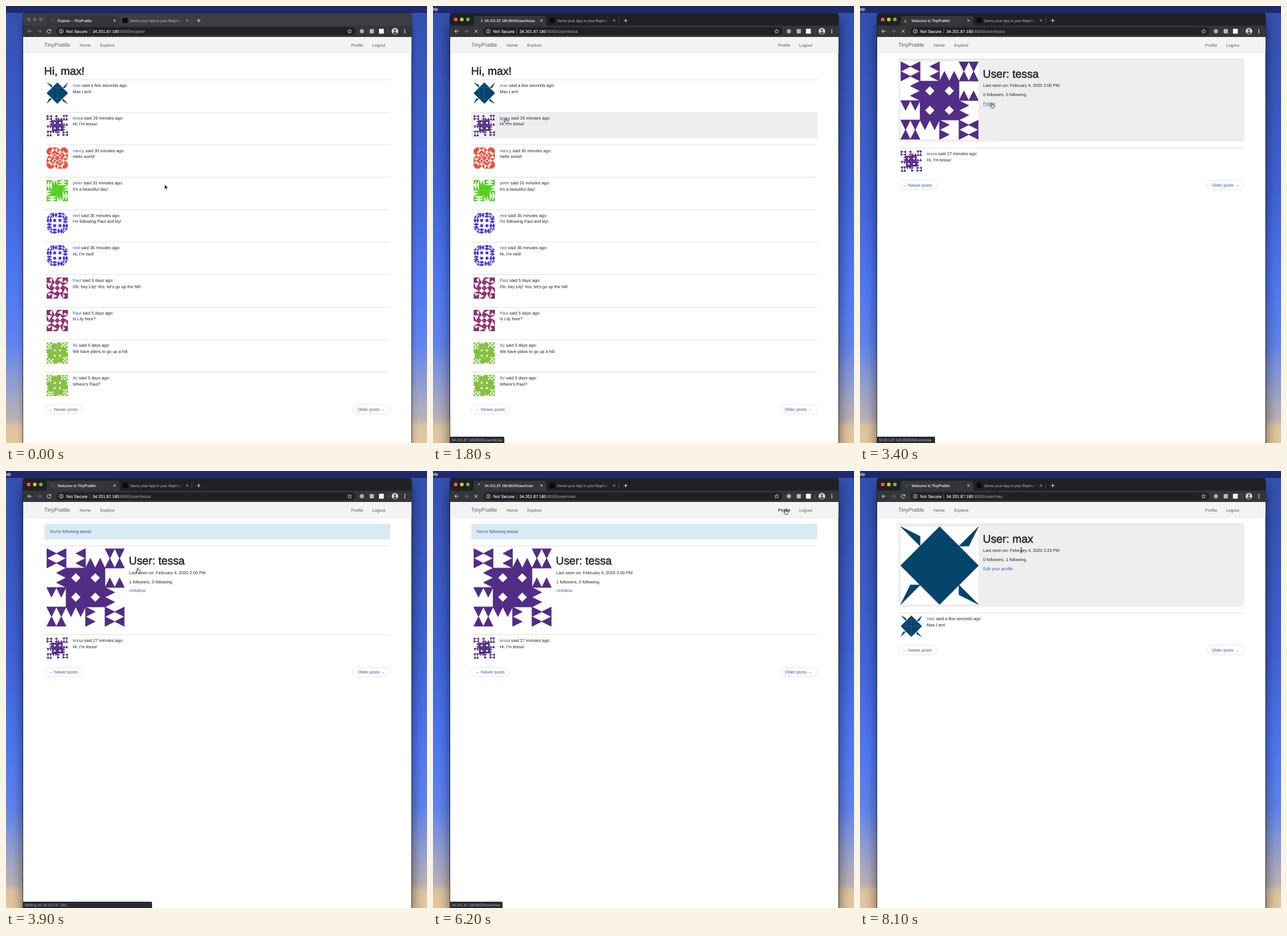
An HTML page for the animation above (8200 ms loop, 735x762 px).

```html
<!DOCTYPE html>
<html lang="en">
<head>
<meta charset="utf-8">
<title>TinyPrattle</title>
<style>
  html, body { margin: 0; width: 100%; height: 100%; overflow: hidden; background: #3f62d6; }
  svg { display: block; width: 735px; height: 762px; }
  text { font-family: "Liberation Sans", Arial, sans-serif; font-size: 7.45px; fill: #242424;
         text-rendering: geometricPrecision; white-space: pre; }
  .big { font-size: 19.3px; fill: #2b2b2b; stroke: #2b2b2b; stroke-width: .6; }
  .brand { font-size: 9.54px; fill: #606060; }
  .nav { fill: #5c5c5c; }
  .link { fill: #3f57ae; }
  .flash { fill: #3a4a8f; }
  .tab { font-size: 6.38px; fill: #f1f3f4; stroke: #f1f3f4; stroke-width: .12; }
  .tip { font-size: 6.4px; fill: #b4b7bb; }
  .lit { fill: #f1f3f4; stroke: #f1f3f4; stroke-width: .12; }
  .dim { fill: #a6a9ae; }
  .line { fill: none; stroke: #e8eaed; stroke-width: 1; }
</style>
</head>
<body>
<svg id="stage" viewBox="0 0 735 762"></svg>
<script>
const LOOP = 8200, STEP = 100;
const HOST = '34.201.87.180', SITE = HOST + ':8000';

const text = (x, y, s, cls = '') => `<text x="${x}" y="${y}" class="${cls}">${s}</text>`;
const rect = (x, y, w, h, fill, r = 0, more = '') =>
  `<rect x="${x}" y="${y}" width="${w}" height="${h}" rx="${r}" fill="${fill}" ${more}/>`;
const dot = (x, y, r, fill) => `<circle cx="${x}" cy="${y}" r="${r}" fill="${fill}"/>`;
const path = (d, more = 'class="line"') => `<path d="${d}" ${more}/>`;
// Show content only in the given spans of time
const on = (spans, body) => `<g data-on="${spans}">${body}</g>`;

// Avatars: a 4x4 grid whose corner, edge and middle patches turn around the centre
const CORNERS = [[0, 0, 0], [3, 0, 1], [3, 3, 2], [0, 3, 3]];
const EDGES = [[1, 0, 0], [2, 0, 1], [3, 1, 1], [3, 2, 2], [2, 3, 2], [1, 3, 3], [0, 2, 3], [0, 1, 0]];
const MIDDLES = [[1, 1, 0], [2, 1, 1], [2, 2, 2], [1, 2, 3]];
const FULL = 'M0 0H1V1H0Z';
const DIAMOND = 'M.5 .25L.75 .5L.5 .75L.25 .5Z';
const WIDE = 'M.5 0L1 .5L.5 1L0 .5Z';

const icons = {
  max: ['#05446b', 'M0 0L1 .5V1Z', 'M1 0V1H0Z', FULL],
  tessa: ['#512d85', 'M0 0L.5 .25L0 .5ZM1 0L.5 .25L1 .5ZM0 .5L.5 .75L0 1ZM1 .5L.5 .75L1 1Z',
    'M1 0L.5 .25L1 .5ZM1 .5L.5 .75L1 1Z', FULL + DIAMOND],
  nancy: ['#e8523f', 'M.5 0H1V.5L.5 1H0V.5Z', 'M0 0H1L.5 .5ZM0 1L.5 .5L1 1Z',
    FULL + WIDE + 'M.3 .3H.7V.7H.3Z'],
  peter: ['#55cd1f', 'M0 0H.5L0 1ZM.5 0H1L.5 1Z', 'M0 0L.5 1H0ZM.5 0L1 1H.5Z', FULL],
  ned: ['#4a35d5', 'M1 0V.45L.55 .5ZM.5 .5V1H0ZM1 .5V1H.55Z',
    'M.25 0L.5 .5L.25 1L0 .5ZM.75 0L1 .5L.75 1L.5 .5Z', 'M.25 .25H.75V.75H.25Z'],
  Paul: ['#8f2d6b', 'M0 0H1L.5 .5L1 1H0Z', 'M0 0L.5 1L1 0V1H0Z', FULL + WIDE],
  lily: ['#84bf41', FULL + WIDE + DIAMOND, 'M0 0L.25 .4L.5 0L.75 .4L1 0V1H0Z', FULL + DIAMOND],
};

function symbol([name, [color, corner, edge, middle]]) {
  const ring = (cells, d) => cells.map(([x, y, turn]) =>
    path(d, `transform="translate(${x} ${y}) rotate(${turn * 90} .5 .5)"`)).join('');
  return `<symbol id="${name}" viewBox="0 0 4 4"><rect width="4" height="4" fill="#fff"/>
    <g fill="${color}" fill-rule="evenodd" stroke="${color}" stroke-width=".025">
    ${ring(CORNERS, corner)}${ring(EDGES, edge)}${ring(MIDDLES, middle)}</g></symbol>`;
}
const avatar = (name, x, y, size) =>
  `<use href="#${name}" x="${x}" y="${y}" width="${size}" height="${size}"/>`;

const rule = y => rect(67, y, 604, .8, '#d9d9d9');

function post(y, name, when, words, hover) {
  return (hover ? on(hover, rect(67, y, 604, 46, '#eee')) : '') + rule(y) +
    avatar(name, 71, y + 5, 37.2) +
    `<text x="116.5" y="${y + 12.9}"><tspan class="link">${name}</tspan> said ${when}:</text>` +
    text(116.5, y + 23.5, words);
}

function pager(y) {
  const pill = (x, w) => rect(x, y, w, 16.4, '#fff', 8.2, 'stroke="#d9d9d9" stroke-width=".7"');
  return pill(67, 67) + text(74.3, y + 10.9, '← Newer posts', 'link') +
    pill(606.4, 64.4) + text(614.2, y + 10.9, 'Older posts →', 'link');
}

const ROWS = [
  ['max', 'a few seconds ago', 'Max I am!'],
  ['tessa', '26 minutes ago', "Hi, I'm tessa!", '900-2100'],
  ['nancy', '30 minutes ago', 'Hello world!', '800-900'],
  ['peter', '31 minutes ago', "It's a beautiful day!", '500-700'],
  ['ned', '35 minutes ago', "I'm following Paul and lily!"],
  ['ned', '36 minutes ago', "Hi, I'm ned!"],
  ['Paul', '5 days ago', "Oh, hey Lily! Yes, let's go up the hill!"],
  ['Paul', '5 days ago', 'Is Lily here?'],
  ['lily', '5 days ago', 'We have plans to go up a hill.'],
  ['lily', '5 days ago', "Where's Paul?"],
];

const explore = text(66.5, 120, 'Hi, max!', 'big') +
  ROWS.map((row, i) => post(128.3 + i * 56.65, ...row)).join('') +
  on('1100-2100', rect(116.5, 198.6, 17.6, .6, '#3f57ae')) + pager(695);

function profile(y, name, seen, counts, action, hover, last) {
  return on(hover, rect(67, y, 604, 144.5, '#eee')) + rule(y) +
    avatar(name, 71, y + 5, 135.8) +
    text(214.5, y + 33, 'User: ' + name, 'big') +
    text(215, y + 49.4, 'Last seen on: February 4, 2020 ' + seen) +
    text(215, y + 65.3, counts) + text(215, y + 81.2, action, 'link') +
    post(y + 155, name, ...last) + pager(y + 212);
}

const tessaPost = ['27 minutes ago', "Hi, I'm tessa!"];
const pages = on('0-2100', explore) +
  on('2100-3800', profile(92, 'tessa', '2:00 PM', '0 followers, 0 following.', 'Follow', '2200-3800', tessaPost) +
    on('2900-3800', rect(215, 174.4, 22, .6, '#3f57ae'))) +
  on('3800-6700', rect(67, 92, 604, 27.6, '#d8ebf3', 2) +
    text(75.5, 108.4, "You're following tessa!", 'flash') +
    profile(130.2, 'tessa', '2:00 PM', '1 followers, 0 following.', 'Unfollow', '4200-5000', tessaPost)) +
  on('6700-8200', profile(92, 'max', '2:23 PM', '0 followers, 1 following.', 'Edit your profile', '7200-8200',
    ['a few seconds ago', 'Max I am!']));

const navbar = rect(30, 54, 678, 27, '#f3f3f3') + rect(30, 81, 678, .8, '#dfdfdf') +
  text(66.7, 71.2, 'TinyPrattle', 'brand') + text(128.4, 70.5, 'Home', 'nav') +
  text(164.4, 70.5, 'Explore', 'nav') + text(602.5, 70.5, 'Profile', 'nav') +
  on('5700-7000', text(602.5, 70.5, 'Profile')) + text(639.3, 70.5, 'Logout', 'nav');

const BUSY = '1700-2100 3400-3800 6000-6700';
const IDLE = '0-1700 2100-3400 3800-6000 6700-8200';
const cross = (x, y, r) => `M${x - r} ${y - r}l${2 * r} ${2 * r}m0 ${-2 * r}l${-2 * r} ${2 * r}`;

const lights = colors => colors.map((c, i) => dot(39.7 + i * 10.6, 23.4, 3.2, c)).join('');
const tabTitle = (spans, s) => on(spans, text(90, 27.6, s, 'tab'));
const url = (spans, s) => on(spans, text(197.7, 46.7, ':8000/' + s, 'dim'));
const strip = color => path('M30 35V17.5Q30 12.5 35 12.5H703Q708 12.5 708 17.5V35Z', `fill="${color}"`);

const tabs = strip('#3c3e42') + on('400-8200', strip('#1f2124')) +
  on('0-400', lights(['#606367', '#606367', '#606367'])) +
  on('400-8200', lights(['#f45c53', '#e9bd3e', '#58c13b'])) +
  path('M67 34.5Q71 34.5 71 30.5V21Q71 17 75 17H194Q198 17 198 21V30.5Q198 34.5 202 34.5Z', 'fill="#35363a"') +
  on(IDLE, '<circle cx="82" cy="25.2" r="3" fill="none" stroke="#55585d" stroke-width=".8"/>' +
    path('M80 23.2l4 4', 'stroke="#55585d" stroke-width=".8"')) +
  on(BUSY, path('M78.8 25.2A3.3 3.3 0 0 1 82.1 21.9', 'class="line" id="spin"')) +
  tabTitle('0-1700', 'Explore -- TinyPrattle') + tabTitle('1700-2100', SITE + '/user/tessa') +
  tabTitle('2100-6000 6700-8200', 'Welcome to TinyPrattle!') + tabTitle('6000-6700', SITE + '/user/max') +
  path(cross(189.5, 25.4, 2)) + rect(203.5, 20.8, 9, 9, '#0a0a0a', 1) +
  '<text x="217" y="27.6" style="font-size:6.38px;fill:url(#fade)">Demo your App in your RepHut R</text>' +
  path(cross(316.2, 25.4, 2), 'fill="none" stroke="#b5b8bd" stroke-width=".9"') +
  rect(324.3, 20.5, .7, 10, '#5b5e63') + path('M333.4 25.4h6.2m-3.1 -3.1v6.2');

const toolbar = rect(30, 34.3, 678, 19.7, '#35363a') + rect(88, 37, 522, 14, '#202124', 7) +
  path('M45 44H38m3.2 -3.3L37.9 44l3.3 3.3') +
  on('0-400', rect(36, 39, 11, 10, '#35363a', 0, 'opacity=".45"')) +
  path('M54.5 44h7m-3.2 -3.3l3.3 3.3l-3.3 3.3', 'fill="none" stroke="#85888c" stroke-width=".9"') +
  on(IDLE, path('M77.6 42.2A3.2 3.2 0 1 0 78.1 45.2') + path('M78.6 40.2v3.2h-3.2Z', 'fill="#e8eaed"')) +
  on(BUSY, path(cross(75.2, 44, 2.6))) +
  '<circle cx="96.5" cy="44" r="3.4" class="line" style="stroke-width:.9"/>' +
  rect(96, 43.5, 1, 2.4, '#e8eaed') + rect(96, 41.9, 1, 1, '#e8eaed') +
  text(105, 46.7, 'Not Secure', 'lit') + rect(145.6, 39.8, .8, 8.4, '#85888c') +
  `<text x="151" y="46.7" class="lit" style="font-size:7.3px">${HOST}</text>` +
  url('0-1700', 'explore') + url('1700-6000', 'user/tessa') + url('6000-8200', 'user/max') +
  path('M600 40.4l1 2.5l2.7 .2l-2.1 1.7l.7 2.6l-2.3 -1.5l-2.3 1.5l.7 -2.6l-2.1 -1.7l2.7 -.2Z',
    'fill="none" stroke="#d5d7da" stroke-width=".8"') +
  dot(621.3, 44, 3.7, '#a9acb0') + rect(634.9, 40.3, 7.4, 7.4, '#b6b8bb', 1) +
  rect(651.2, 39.8, 8.4, 8.4, '#fff', .8) + rect(667, 39.8, .7, 8.4, '#66696d') +
  dot(679, 44, 5.8, '#d5d8db') + dot(679, 42, 1.9, '#55585c') +
  path('M675.6 48.2Q675.8 44.4 679 44.4T682.4 48.2Q679 50.4 675.6 48.2Z', 'fill="#55585c"') +
  [41.2, 44, 46.8].map(y => dot(696.3, y, .95, '#f1f3f4')).join('');

const tip = (spans, w, s, id = '') => on(spans, `<g id="${id}">` +
  path(`M30 762V751H${28 + w}Q${30 + w} 751 ${30 + w} 753V762Z`, 'fill="#292b2f"') +
  text(32.4, 759, s, 'tip') + '</g>');
const tips = tip('1200-2100', 94.5, SITE + '/user/tessa', 'fadeTip') +
  tip('3000-3500', 101, SITE + '/follow/tessa') +
  tip('3500-4000', 225, `Waiting for ${HOST}...`) +
  tip('5700-6700', 91.5, SITE + '/user/max');

const ARROW = 'M0 0V8.6L2 6.9L3.3 9.8L4.6 9.2L3.4 6.4H6Z';
const HAND = 'M-.9 .3Q0 -.7 .8 .3V3.2L3.6 3.8Q4.4 4.1 4.2 5.2L3.4 8.8H-.6L-3 5.6Q-2.9 4.4 -1.9 4.9L-.9 5.7Z';
const BEAM = 'M-1.6 -4.6Q0 -4.6 0 -3.4Q0 -4.6 1.6 -4.6M0 -3.4V3.4M-1.6 4.6Q0 4.6 0 3.4Q0 4.6 1.6 4.6';
const cursor = '<g id="cursor">' +
  on('0-1100 2200-2900 5000-5700 7000-7700', path(ARROW, 'fill="#111" stroke="#fff" stroke-width=".7"')) +
  on('1100-2200 2900-4200 5700-7000', path(HAND, 'fill="#fff" stroke="#111" stroke-width=".8"')) +
  on('4200-5000 7700-8200', path(BEAM, 'fill="none" stroke="#222" stroke-width=".9"')) + '</g>';

const SKY = [[.015, '#3450b0'], [.4, '#3f62d6'], [.63, '#4f77f2'], [.77, '#5f83ee'], [.865, '#919dd0'],
  [.91, '#a9a9bf'], [.945, '#b8b1b4'], [.962, '#dcc3a0'], [1, '#e3c79f']];
const stops = list => list.map(([o, c]) => `<stop offset="${o}" stop-color="${c}"/>`).join('');
const shadow = (blur, alpha) =>
  rect(30, 26, 678, 780, '#000', 6, `opacity="${alpha}" style="filter:blur(${blur}px)"`);

document.getElementById('stage').innerHTML = `<defs>
  <linearGradient id="sky" x2="0" y2="1">${stops(SKY)}</linearGradient>
  <linearGradient id="fade" gradientUnits="userSpaceOnUse" x1="293" x2="310">
    <stop stop-color="#c4c7cb"/><stop offset="1" stop-color="#c4c7cb" stop-opacity="0"/></linearGradient>
  ${Object.entries(icons).map(symbol).join('')}</defs>` +
  rect(0, 0, 735, 762, 'url(#sky)') + on('0-400', shadow(6, .35)) + on('400-8200', shadow(11, .58)) +
  rect(0, 0, 735, 12, '#1d2a6c') + on('400-8200', text(-1, 8.4, 'elp', 'lit')) +
  rect(29.3, 12, 679.2, 754, '#17191d', 5) + rect(30, 40, 677.7, 724, '#fff', 3) +
  tabs + toolbar + navbar + pages + tips + cursor;

// Pointer stops: time, x, y
const TRACK = [[0, 277, 311], [400, 277, 311], [1100, 127, 196], [2100, 127, 196], [2500, 192, 216],
  [2900, 228, 168], [3100, 230, 169], [4100, 230, 169], [4600, 253.5, 148.5], [4900, 253.5, 148.5],
  [5300, 539, 70], [5400, 566, 62], [5700, 615.5, 67], [6900, 615.5, 67], [7400, 319, 166],
  [7900, 281.5, 138], [LOOP, 281.5, 138]];

function pointer(t) {
  const i = TRACK.findIndex(p => p[0] > t);
  const [t0, x0, y0] = TRACK[i - 1], [t1, x1, y1] = TRACK[i];
  const k = (t - t0) / (t1 - t0);
  return [x0 + (x1 - x0) * k, y0 + (y1 - y0) * k];
}

const timed = [...document.querySelectorAll('[data-on]')].map(el =>
  [el, el.dataset.on.split(' ').map(s => s.split('-').map(Number))]);
const byId = id => document.getElementById(id);
const start = performance.now();

function draw() {
  const t = Math.floor((performance.now() - start) % LOOP / STEP) * STEP;
  for (const [el, spans] of timed)
    el.style.display = spans.some(([a, b]) => t >= a && t < b) ? '' : 'none';
  byId('cursor').setAttribute('transform', `translate(${pointer(t)})`);
  byId('spin').setAttribute('transform', `rotate(${(6200 - t) * .36} 82.1 25.2)`);
  byId('fadeTip').setAttribute('opacity', t < 1300 ? .42 : 1);
  requestAnimationFrame(draw);
}
draw();
</script>
</body>
</html>
```
